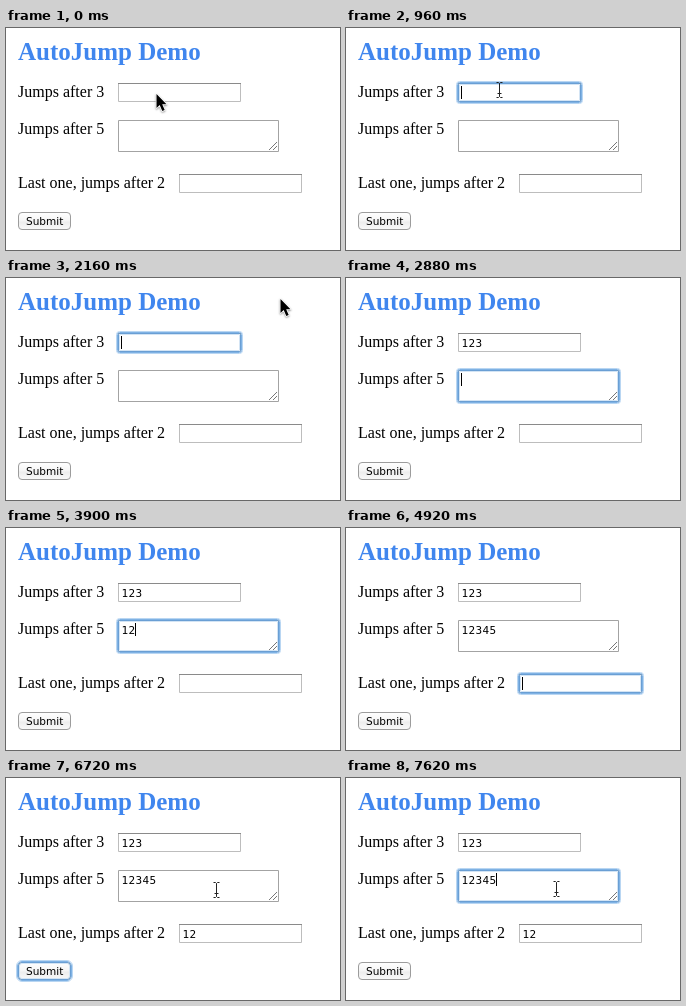
An HTML page with a canvas for the animation above (8 s loop, 334 px wide and 222 px high).

```html
<!DOCTYPE html>
<html lang="en">
<head>
<meta charset="utf-8">
<title>AutoJump Demo</title>
<style>
  html, body { margin: 0; width: 100%; height: 100%; overflow: hidden; background: #fff; }
  canvas { display: block; width: 334px; height: 222px; }
</style>
</head>
<body>
<canvas id="stage" width="334" height="222"></canvas>
<script>
const ctx = document.getElementById('stage').getContext('2d');
const LOOP = 8000, STEP = 60;
const SERIF = '"Liberation Serif", "Times New Roman", serif';
const SANS = '"DejaVu Sans", sans-serif';
const MONO = '"DejaVu Sans Mono", monospace';

// keys: the times at which each digit is typed
const fields = [
  { x: 112, y: 55, w: 123, h: 19, keys: [2220, 2520, 2760] },
  { x: 112, y: 92, w: 161, h: 32, keys: [3660, 3900, 4200, 4500, 4800], area: true },
  { x: 173, y: 146, w: 123, h: 19, keys: [5700, 5940] }
];
const button = { x: 12, y: 184, w: 53, h: 18 };

// [start, focused element]
const focusTimes = [
  [780, fields[0]], [2760, fields[1]], [4800, fields[2]],
  [5940, button], [7620, fields[1]]
];

// [start, end] of each visible caret phase
const caretTimes = [
  [780, 1260], [1740, 3360], [3660, 5280], [5700, 5940], [7620, 8000]
];

// [time, x, y] of the pointer's hot spot
const path = [
  [0, 150, 66], [420, 154, 62], [1020, 154, 62], [1620, 274, 21],
  [5940, 274, 21], [6120, 235, 84], [6360, 220, 100], [6600, 220, 100],
  [6720, 211, 112], [6900, 211, 112], [6960, 211, 111]
];

const within = (t, [start, end]) => t >= start && t < end;

function focusAt(t) {
  let current = null;
  for (const [start, item] of focusTimes) if (t >= start) current = item;
  return current;
}

function pointerAt(t) {
  const i = path.findIndex(p => p[0] > t);
  if (i < 0) return path[path.length - 1].slice(1);
  const [t0, x0, y0] = path[i - 1], [t1, x1, y1] = path[i];
  const u = (t - t0) / (t1 - t0), k = u * u * (3 - 2 * u);
  return [Math.round(x0 + (x1 - x0) * k), Math.round(y0 + (y1 - y0) * k)];
}

function label(text, x, y, font, color = '#000') {
  ctx.font = font;
  ctx.fillStyle = color;
  ctx.fillText(text, x, y);
}

function line(color, width, ...points) {
  ctx.strokeStyle = color;
  ctx.lineWidth = width;
  ctx.beginPath();
  points.forEach(([x, y], i) => i ? ctx.lineTo(x, y) : ctx.moveTo(x, y));
  ctx.stroke();
}

// One pixel outline, grown outwards from the box
function ring({ x, y, w, h }, grow, radius, color) {
  ctx.strokeStyle = color;
  ctx.lineWidth = 1;
  ctx.beginPath();
  ctx.roundRect(x - grow + 0.5, y - grow + 0.5, w + 2 * grow - 1, h + 2 * grow - 1, radius);
  ctx.stroke();
}

function glow(box, radius) {
  ring(box, 2, radius + 2, '#b9d6f2');
  ring(box, 1, radius + 1, '#7fb2e4');
  ring(box, 0, radius, '#6a9fd4');
  ring(box, -1, Math.max(radius - 1, 0), '#d3e4f4');
}

function drawField(f, t, focused) {
  const { x, y, w, h } = f;
  ring(f, 0, 0, f.area ? '#a3a3a3' : '#bdbdbd');
  if (!f.area) line('#8a8a8a', 1, [x, y + 0.5], [x + w, y + 0.5]);
  if (focused) glow(f, 1);
  if (f.area) {
    const right = x + w - 2, bottom = y + h - 2;
    for (const size of [8, 4]) {
      line('#777', 1, [right - size, bottom], [right, bottom - size]);
    }
  }
  const typed = f.keys.filter(k => t >= k).length;
  for (let i = 0; i < typed; i++) {
    label(String(i + 1), x + 3.5 + 7 * i, y + 14, '11px ' + MONO);
  }
  if (focused && caretTimes.some(span => within(t, span))) {
    ctx.fillStyle = '#000';
    ctx.fillRect(x + 3 + 7 * typed, y + 3, 1, 13);
  }
}

function drawButton(focused) {
  const { x, y, w, h } = button;
  const fill = ctx.createLinearGradient(0, y, 0, y + h);
  fill.addColorStop(0, '#fff');
  fill.addColorStop(0.5, '#f5f5f5');
  fill.addColorStop(0.55, '#ededed');
  fill.addColorStop(1, '#fafafa');
  ctx.fillStyle = fill;
  ctx.beginPath();
  ctx.roundRect(x, y, w, h, 4);
  ctx.fill();
  ring(button, 0, 3.5, '#9c9c9c');
  if (focused) glow(button, 3.5);
  label('Submit', 20, 197, '10.5px ' + SANS);
}

function drawArrow(x, y) {
  const shape = [[0, 0], [0, 14], [3.2, 11], [5.8, 17], [8.2, 16], [5.7, 10.2], [10, 10.2]];
  ctx.save();
  ctx.translate(x + 0.5, y);
  ctx.beginPath();
  shape.forEach(p => ctx.lineTo(...p));
  ctx.closePath();
  ctx.lineJoin = 'round';
  ctx.shadowColor = 'rgba(0,0,0,.4)';
  ctx.shadowBlur = 2;
  ctx.shadowOffsetY = 1;
  ctx.strokeStyle = '#fff';
  ctx.lineWidth = 1.6;
  ctx.stroke();
  ctx.shadowColor = 'transparent';
  ctx.fillStyle = '#000';
  ctx.fill();
  ctx.restore();
}

function drawBeam(x, y) {
  const top = y - 7.5, bottom = y + 7.5, mid = x - 0.5;
  line('#222', 1, [mid - 3, top], [mid - 1, top], [mid, top + 1],
    [mid, bottom - 1], [mid - 1, bottom], [mid - 3, bottom]);
  line('#222', 1, [mid + 3, top], [mid + 1, top], [mid, top + 1]);
  line('#222', 1, [mid, bottom - 1], [mid + 1, bottom], [mid + 3, bottom]);
  line('#222', 1, [mid - 2, y + 3.5], [mid + 2, y + 3.5]);
}

function drawPointer(t) {
  // The pointer hides while typing
  if (within(t, [2220, 6000])) return;
  const [x, y] = pointerAt(t);
  const overField = fields.some(f => within(x, [f.x, f.x + f.w]) && within(y, [f.y, f.y + f.h]));
  if (overField && t >= STEP) drawBeam(x, y);
  else drawArrow(x, y);
}

function draw(t) {
  const focus = focusAt(t);
  ctx.fillStyle = '#fff';
  ctx.fillRect(0, 0, 334, 222);
  label('AutoJump Demo', 12, 32, 'bold 25px ' + SERIF, '#4086ee');
  label('Jumps after 3', 12, 69, '16px ' + SERIF);
  label('Jumps after 5', 12, 106, '16px ' + SERIF);
  label('Last one, jumps after 2', 12, 160, '16px ' + SERIF);
  fields.forEach(f => drawField(f, t, f === focus));
  drawButton(focus === button);
  drawPointer(t);
}

const begin = performance.now();
function tick() {
  const t = (performance.now() - begin) % LOOP;
  draw(Math.floor(t / STEP) * STEP);
  requestAnimationFrame(tick);
}
tick();
</script>
</body>
</html>
```
